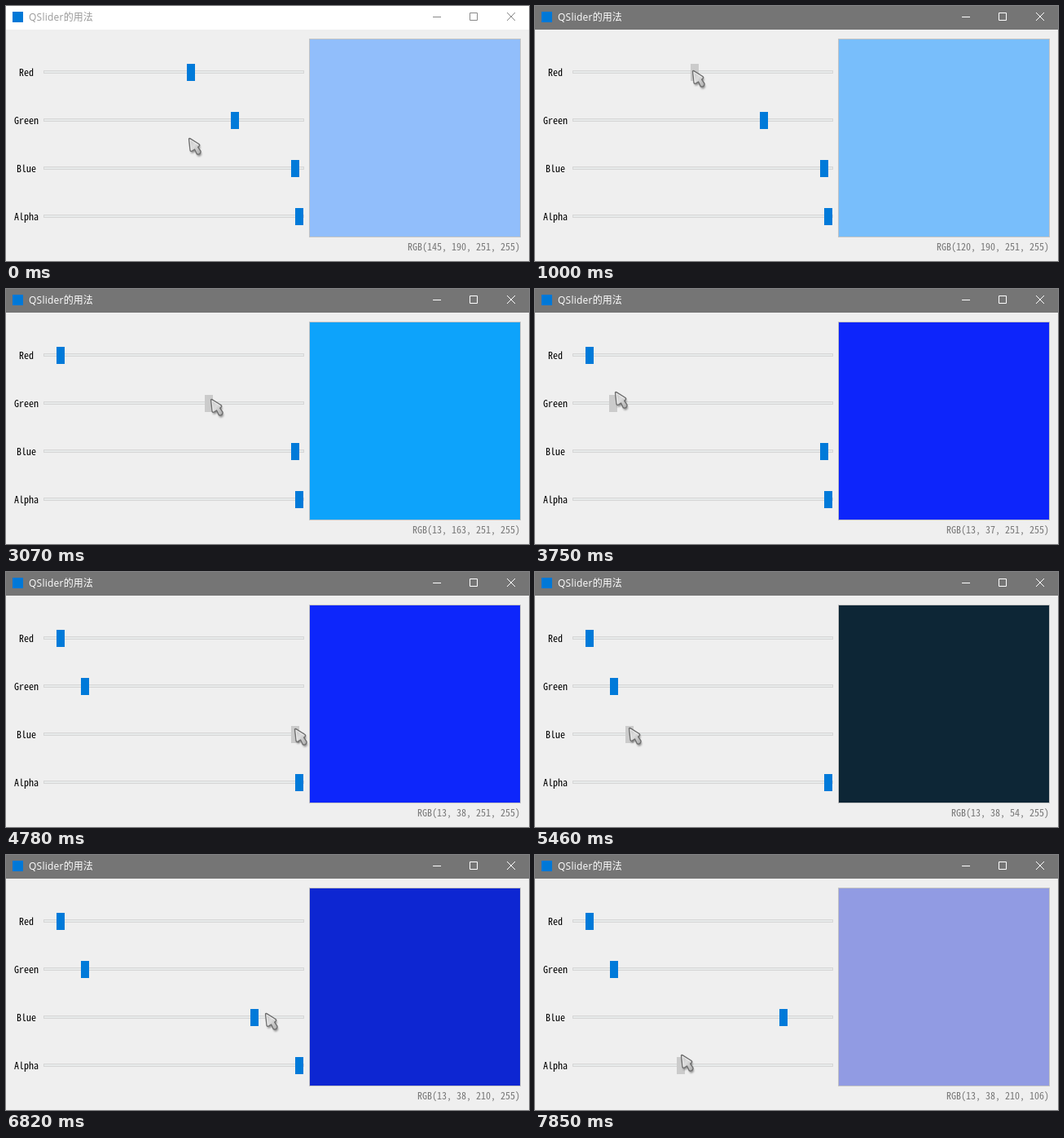
An HTML page for the animation above (8 s loop, 642 px wide and 313 px high).

```html
<!DOCTYPE html>
<html lang="zh">
<head>
<meta charset="utf-8">
<title>QSlider的用法</title>
<style>
  html, body { margin: 0; width: 100%; height: 100%; overflow: hidden; background: #efefef; }
  svg { display: block; width: 100vw; height: 100vh; }
  .mono { font: 12px "Noto Sans Mono CJK SC", "Noto Sans Mono CJK JP", monospace; }
  .title { font: 12px "Open Sans", "Noto Sans CJK SC", sans-serif; }
</style>
</head>
<body>
<svg id="stage" viewBox="0 0 642 313">
  <defs>
    <linearGradient id="metal" x1="0" y1="0" x2="1" y2="1">
      <stop offset="0" stop-color="#c2c2c2"/>
      <stop offset=".45" stop-color="#dcdcdc"/>
      <stop offset="1" stop-color="#a8a8a8"/>
    </linearGradient>
    <filter id="soft" x="-50%" y="-50%" width="200%" height="200%">
      <feGaussianBlur stdDeviation="1.2"/>
    </filter>
    <path id="arrow" d="M.5 1.5 Q.5 0 2 .6 L12.6 7.2 Q15 9 12.6 10.4 L11.6 11.2 L15 16.2 Q15.4 19.6 11.6 20.2 L10.2 19.6 L7.6 14 L4.4 16 Q2.4 17 2 14.8 Z"/>
  </defs>
  <rect width="642" height="313" fill="#efefef"/>
  <rect id="bar" width="642" height="29"/>
  <rect x="8" y="7" width="13" height="13" fill="#0078d7"/>
  <text id="title" class="title" x="28" y="18"><tspan letter-spacing=".25">QSlider</tspan>的用法</text>
  <path id="buttons" d="M524 13.5h10M569.5 8.5h9v9h-9zM615 8l10 10M625 8l-10 10" fill="none"/>
  <g id="rows"></g>
  <rect x="372.5" y="40.5" width="259" height="243" fill="#efefef" stroke="#c3c3c3"/>
  <rect id="panel" x="373" y="41" width="258" height="242"/>
  <text id="label" class="mono" x="631" y="300" text-anchor="end" fill="#777"></text>
  <g id="cursor">
    <use href="#arrow" x="1" y="2.5" fill="#000" opacity=".4" filter="url(#soft)"/>
    <use href="#arrow" fill="url(#metal)" stroke="#6c6c6c" stroke-width="1.3" stroke-linejoin="round"/>
    <path d="M2 2.2L3.4 14.6M2 2.2L11.8 8.4" fill="none" stroke="#f4f4f4" stroke-width=".8"/>
  </g>
</svg>
<script>
const LOOP = 8000, ACTIVATE = 670;
const RED = 0, GREEN = 1, BLUE = 2, ALPHA = 3;
const START = [145, 190, 251, 255];

// time, pointer x, pointer y [, slider, value [, "up" = released | "late" = panel not repainted]]
const STEPS = [
  [0, 224, 162],
  [330, 224, 93],
  [ACTIVATE, 224, 79, RED, 145],
  [1000, 193, 79, RED, 120],
  [1350, 175, 79, RED, 105, "late"],
  [1680, 118, 79, RED, 58],
  [2030, 64, 79, RED, 13],
  [2380, 243, 125],
  [2710, 281, 134, GREEN, 190],
  [3070, 251, 135, GREEN, 163],
  [3400, 132, 131, GREEN, 65],
  [3750, 98, 126, GREEN, 37],
  [4100, 391, 205, GREEN, 38, "up"],
  [4430, 377, 205],
  [4780, 354, 192, BLUE, 251],
  [5110, 252, 192, BLUE, 167],
  [5460, 115, 191, BLUE, 54],
  [5810, 75, 193, BLUE, 21],
  [6140, 165, 195, BLUE, 96],
  [6490, 247, 195, BLUE, 163],
  [6820, 318, 194, BLUE, 210, "up"],
  [7170, 352, 253],
  [7520, 358, 252, ALPHA, 254],
  [7850, 179, 245, ALPHA, 106]
];

const $ = id => document.getElementById(id);

function add(parent, tag, attrs, text) {
  const el = document.createElementNS("http://www.w3.org/2000/svg", tag);
  set(el, attrs);
  if (text) el.textContent = text;
  return parent.appendChild(el);
}

function set(el, attrs) {
  for (const key in attrs) el.setAttribute(key, attrs[key]);
}

const handles = ["Red", "Green", "Blue", "Alpha"].map((name, i) => {
  const y = 71 + 59 * i, rows = $("rows");
  add(rows, "text", { class: "mono", x: 25, y: y + 15, "text-anchor": "middle" }, name);
  add(rows, "rect", { x: 46.5, y: y + 8.5, width: 319, height: 3, fill: "#e7eaea", stroke: "#d6d6d6" });
  return add(rows, "rect", { y, width: 10, height: 21 });
});

function stateAt(t) {
  const values = [...START];
  let color = [...START], held, x, y;
  for (const [time, px, py, slider, value, note] of STEPS) {
    if (time > t) break;
    [x, y] = [px, py];
    held = note === "up" ? undefined : slider;
    if (slider !== undefined) values[slider] = value;
    if (note !== "late") color = [...values];
  }
  return { values, color, held, x, y };
}

function render(t) {
  const { values, color, held, x, y } = stateAt(t);
  const active = t >= ACTIVATE;
  set($("bar"), { fill: active ? "#757575" : "#fff" });
  set($("title"), { fill: active ? "#fff" : "#999" });
  set($("buttons"), { stroke: active ? "#fff" : "#888" });
  handles.forEach((handle, i) => set(handle, {
    x: 46 + Math.round(values[i] * 309 / 255),
    fill: i === held ? "#cbcbcb" : "#007ad9"
  }));
  const [r, g, b, a] = color;
  set($("panel"), { fill: `rgb(${r},${g},${b})`, "fill-opacity": a / 255 });
  $("label").textContent = `RGB(${values.join(", ")})`;
  set($("cursor"), { transform: `translate(${x} ${y})` });
}

function tick() {
  render(performance.now() % LOOP);
  requestAnimationFrame(tick);
}
tick();
</script>
</body>
</html>
```
